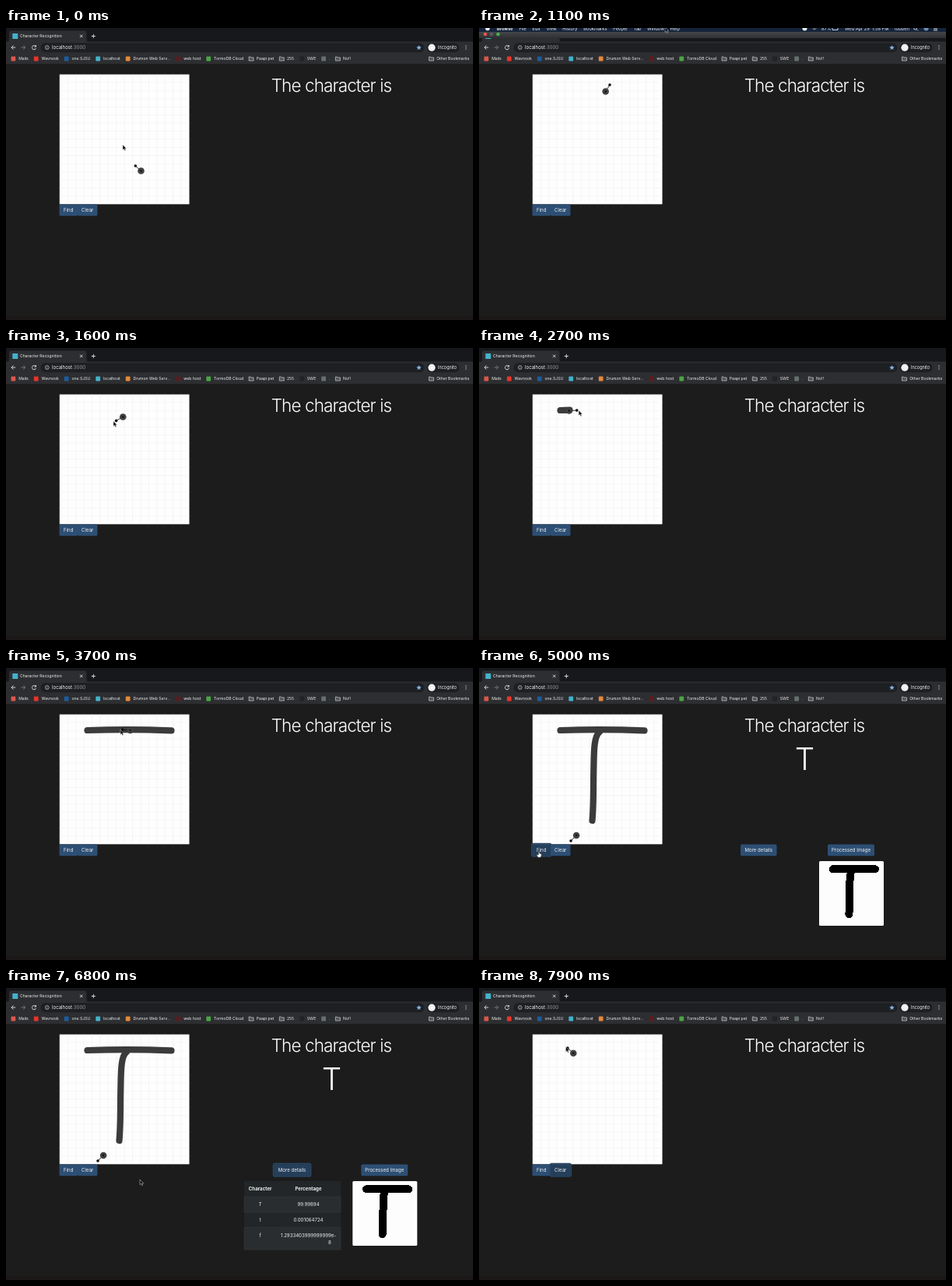
An HTML page that plays this animation: 600 by 375 pixels, repeating every 8000 ms.

```html
<!DOCTYPE html>
<html lang="en">
<head>
<meta charset="utf-8">
<title>Character Recognition</title>
<style>
  html, body { margin: 0; width: 100%; height: 100%; overflow: hidden; background: #1c1c1c; }
  svg { display: block; width: 100vw; height: 100vh; }
  text { font-family: Inter, Roboto, "Liberation Sans", sans-serif; fill: #f1f1f2; white-space: pre; }
  .ui { font-size: 5.1px; }
  .menu { font-size: 5.7px; }
  .url { font-size: 6.1px; }
  .btn text, .cell { font-size: 6.1px; text-anchor: middle; }
  .btn .face { fill: #2d4f74; }
  .btn .ring { fill: none; stroke: #294765; stroke-width: 1.6; }
  .bold { font-weight: 700; }
  .title, .answer { font-weight: 300; text-anchor: middle; fill: #fff; }
  .title { font-size: 22.5px; letter-spacing: -.9px; }
  .answer { font-size: 40px; }
  .line { fill: none; stroke: #e4e6e8; stroke-width: .9; }
  .thin { stroke-width: .6; }
  .ink { fill: none; stroke: #3b3b3b; stroke-width: 8.2; stroke-linecap: round; stroke-linejoin: round; }
  .scan { stroke: #000; stroke-width: 20; shape-rendering: crispEdges; }
</style>
</head>
<body>
<svg viewBox="0 0 600 375" preserveAspectRatio="none">
  <defs>
    <path id="barShape" pathLength="100" d="M104.500 80Q158 78 212.500 80.300"/>
    <path id="stemShape" pathLength="100" d="M155 82C147 88 147.800 110 147.300 130S147.500 175 145.500 196"/>
    <linearGradient id="titleBar" x2="0" y2="1">
      <stop stop-color="#45474b"/><stop offset="1" stop-color="#2f3033"/>
    </linearGradient>
  </defs>
  <rect width="600" height="375" fill="#1c1c1c"/>
  <rect y="370" width="600" height="5" fill="#1c1818"/>

  <!-- browser window -->
  <rect width="600" height="18" fill="#17181b"/>
  <rect y="17.500" width="600" height="28.500" fill="#2d2e31"/>
  <path d="M2 18Q4 18 4 15.500V6Q4 3.500 6.500 3.500H101Q103.500 3.500 103.500 6V15.500Q103.500 18 106 18Z" fill="#2d2e31"/>
  <rect x="8.300" y="7" width="7" height="7" rx=".6" fill="#42b3cb"/>
  <text class="ui" x="18" y="12.300">Character Recognition</text>
  <path class="line" d="M95 8.700l3.400 3.400m0-3.400l-3.400 3.400M109.700 10.500h5.200m-2.600-2.600v5.200"/>
  <rect x="44.500" y="19.200" width="493" height="12" rx="6" fill="#1e1f22"/>
  <path class="line" d="M12.200 25H7m2.500-2.600L6.900 25l2.600 2.600"/>
  <path class="line" style="stroke:#7c7e81" d="M19.500 25h5.200m-2.500-2.600l2.600 2.600l-2.600 2.600"/>
  <path class="line" d="M38.200 23.600a2.600 2.600 0 1 0 .4 2.200M38.500 22v2h-2"/>
  <circle class="line thin" cx="52.800" cy="25" r="2.400"/>
  <path class="line thin" d="M52.800 24.700v1.700m0-3v.6"/>
  <text class="url" x="59" y="27.200">localhost<tspan fill="#94979b">:3000</tspan></text>
  <path d="M530.500 21.900l.9 2.100 2.300.2-1.700 1.500.5 2.300-2-1.200-2 1.200.5-2.300-1.700-1.500 2.300-.2Z" fill="#83b0f5"/>
  <rect x="540.500" y="19.200" width="42" height="12" rx="6" fill="#1e1f22"/>
  <circle cx="547" cy="25.200" r="4.600" fill="#f0f1f2"/>
  <text class="ui" style="font-size:5.500px" x="555" y="27.100">Incognito</text>
  <path d="M591 22.900v.01m0 2.090v.01m0 2.090v.01" stroke="#e4e6e8" stroke-width="1.200" stroke-linecap="round"/>
  <g id="bookmarks"></g>

  <!-- system menu that slides over the tabs -->
  <g id="menu">
    <rect y="9" width="600" height="8.500" fill="url(#titleBar)"/>
    <circle cx="8" cy="12.500" r="2.300" fill="#e2574e"/>
    <circle cx="16" cy="12.500" r="2.300" fill="#5a5b5e"/>
    <circle cx="24.500" cy="12.500" r="2.300" fill="#45b549"/>
    <rect width="600" height="9.300" fill="#14233b"/>
    <circle cx="11" cy="5" r="2.800" fill="#eee"/>
    <circle cx="418.500" cy="5" r="3" fill="#eee"/>
    <path class="line" d="M428 4.500q3-2.500 6 0m-4.500 1.600q1.500-1.200 3 0M454 3h7v4h-7z"/>
    <text class="menu" x="440" y="7.500">87%</text>
    <text class="menu" x="470" y="7.500">Wed Apr 29  1:58 PM</text>
    <text class="menu" x="534" y="7.500">tobben</text>
    <circle class="line" cx="560.500" cy="4.700" r="1.900"/>
    <path class="line" d="M562 6.200l1.800 1.800M584 3.500h5m-5 2h5m-5 2h5"/>
    <circle cx="574.500" cy="5" r="3" fill="#6c8fb5"/>
  </g>

  <!-- drawing board -->
  <rect id="board" fill="#fefefe"/>
  <path id="grid" fill="none" stroke="#ececed" stroke-width=".5"/>
  <use id="bar" class="ink" href="#barShape"/>
  <use id="stem" class="ink" href="#stemShape"/>
  <path id="link" stroke="#161616" stroke-width=".9"/>
  <g id="brush"><circle r="4.300" fill="#404040"/><circle r="1.200" fill="#111"/></g>
  <circle id="tip" r="1.800" fill="#0a0a0a"/>

  <text class="title" x="418" y="82">The character is</text>
  <g id="buttons"></g>
  <g id="result">
    <text class="answer" x="418.500" y="130.500">T</text>
    <g id="processed">
      <rect x="437" y="248" width="83" height="83" rx="1.600" fill="#fdfdfd"/>
      <g transform="translate(402.600 218.200) scale(.5)">
        <use class="ink scan" href="#barShape"/><use class="ink scan" href="#stemShape"/>
      </g>
    </g>
  </g>
  <g id="table">
    <rect x="306" y="248" width="124" height="88" fill="#222628"/>
    <path d="M306 268.300h124v19.700H306zM306 307.500h124V336H306z" fill="#2a2d2f" stroke="#34383b" stroke-width=".6"/>
  </g>

  <path id="arrow" d="M0 0V6.500L1.500 5.200 2.600 7.600 3.800 7 2.700 4.800H4.700Z" fill="#080808" stroke="#ddd" stroke-width=".5"/>
  <path id="hand" d="M-.7.500Q0-.5.700.500V3L3.200 3.800V6L2.200 8.200H-1.300L-2.800 5.200-2.300 4.300-.7 5Z" fill="#fff" stroke="#111" stroke-width=".5"/>
</svg>
<script>
const NS = "http://www.w3.org/2000/svg";
const LOOP = 8000, STEP = 100;
const BOARD = { x: 68.8, y: 59.6, size: 166.7 };
const REACH = 10;   // length of the string between pointer and brush
const LAG = 20;     // delay of the drawn pointer behind the cursor, ms
const CLICK_FIND = 4500, SOLVED = 4700, CLICK_DETAILS = 5900, EXPANDED = 6000, CLEARED = 7400;

const $ = id => document.getElementById(id);
function add(parent, tag, attrs, content) {
  const el = document.createElementNS(NS, tag);
  for (const key in attrs) el.setAttribute(key, attrs[key]);
  if (content) el.textContent = content;
  parent.appendChild(el);
  return el;
}
const show = (el, on) => el.setAttribute("visibility", on ? "visible" : "hidden");
const move = (el, x, y) => el.setAttribute("transform", `translate(${x} ${y})`);
const clamp = v => Math.max(0, Math.min(1, v));

// Bookmarks flow from the left; one without a colour is a folder. Returns the end of the label.
function bookmark(label, color, x) {
  const box = $("bookmarks");
  if (color) add(box, "rect", { x, y: 36.6, width: 5.8, height: 5.8, rx: 1, fill: color });
  else add(box, "path", { class: "line thin", style: "fill:#505255", d: `M${x} 37h2l.8 .9h3.200v4.100h-6z` });
  const text = add(box, "text", { class: "ui", x: x + 9.7, y: 41.2 }, label);
  return x + 9.7 + text.getComputedTextLength();
}
[["Mails", "#d8574c"], ["Wavnook", "#e8342c"], ["one.SJSU", "#1c5c9e"], ["localhost", "#42b3cb"],
 ["Drumon Web Serv...", "#e58a3a"], ["web host", "#5c1c22"], ["TormoDB Cloud", "#4aa545"],
 ["Paapi pet"], ["255"], ["SWE", "#222326"], [".", "#65706a"], ["No!!"]
].reduce((x, [label, color]) => bookmark(label, color, x) + 7, 6.5);
bookmark("Other Bookmarks", null, 543.5);

"Browse File Edit View History Bookmarks People Tab Window Help".split(" ").reduce((x, label, i) => {
  const text = add($("menu"), "text", { class: i ? "menu" : "menu bold", x, y: 7.5 }, label);
  return x + text.getComputedTextLength() + 7.7;
}, 23);

for (const [key, value] of Object.entries({ x: BOARD.x, y: BOARD.y, width: BOARD.size, height: BOARD.size }))
  $("board").setAttribute(key, value);
let gridPath = "";
for (let i = 1; i < 16; i++) {
  const d = i * BOARD.size / 16;
  gridPath += `M${BOARD.x + d} ${BOARD.y}v${BOARD.size}M${BOARD.x} ${BOARD.y + d}h${BOARD.size}`;
}
$("grid").setAttribute("d", gridPath);

[["Character", "Percentage"], ["T", "99.99894"], ["t", "0.001064724"], ["f", "1.2933403999999999e-"]
].forEach((row, i) => row.forEach((label, column) => add($("table"), "text", {
  class: i ? "cell" : "cell bold", x: column ? 388.5 : 326.7, y: 260.4 + 19.7 * i
}, label)));
add($("table"), "text", { class: "cell", x: 416, y: 329 }, "8");

function makeButton(label, x, width) {
  const g = add($("buttons"), "g", { class: "btn" });
  const face = add(g, "rect", { class: "face", x, y: 226.4, width, height: 14.8, rx: 1.7 });
  const ring = add(g, "rect", { class: "ring", x: x - .8, y: 225.6, width: width + 1.6, height: 16.4, rx: 2.2 });
  add(g, "text", { x: x + width / 2, y: 236.2 }, label);
  return { g, face, ring, x, width };
}
const find = makeButton("Find", 68.5, 23.5);
const clear = makeButton("Clear", 92, 25.5);
const details = makeButton("More details", 336, 46.5);
const image = makeButton("Processed Image", 448, 60);

// Turning points of the cursor: time, x, y
const cursorPath = [
  [0, 150, 150], [100, 104, 227], [300, 104, 227], [700, 152, 94], [800, 152, 94],
  [880, 168, 73], [1100, 239, -1], [1300, 241, 1], [1500, 156, 91], [1600, 138, 94],
  [1700, 104, 216], [2400, 96, 70], [2600, 116, 80], [3500, 225, 81], [3600, 160, 81],
  [3700, 147, 79], [4080, 144, 206], [4180, 118, 222], [4400, 77, 235], [5100, 77, 235],
  [5400, 110, 235], [5800, 364, 234], [6000, 366, 234], [6300, 497, 236], [6800, 172, 246],
  [7200, 104, 234], [7500, 105, 234], [7600, 147, 98], [7900, 111.5, 75.5]];

function cursorAt(t) {
  const next = cursorPath.findIndex(point => point[0] > t);
  if (next < 0) return cursorPath[cursorPath.length - 1].slice(1);
  const [t0, x0, y0] = cursorPath[next - 1], [t1, x1, y1] = cursorPath[next];
  const p = (t - t0) / (t1 - t0);
  return [x0 + (x1 - x0) * p, y0 + (y1 - y0) * p];
}
const onBoard = ([x, y]) =>
  x > BOARD.x && x < BOARD.x + BOARD.size && y > BOARD.y && y < BOARD.y + BOARD.size;

// The pointer pulls the brush along once the string between them is taut.
const poses = [{ tip: [166.3, 177], brush: [173.5, 183.5] }];
for (let t = STEP; t < LOOP; t += STEP) {
  const last = poses[poses.length - 1];
  const point = cursorAt(t - LAG);
  const tip = onBoard(point) ? point : last.tip;
  const dx = last.brush[0] - tip[0], dy = last.brush[1] - tip[1];
  const slack = Math.min(1, REACH / Math.hypot(dx, dy));
  poses.push({ tip, brush: [tip[0] + dx * slack, tip[1] + dy * slack] });
}

function drawInk(el, t, start, end) {
  const p = clamp((t - start) / (end - start));
  show(el, p > 0 && t < CLEARED);
  el.setAttribute("stroke-dasharray", `${p * 100} 200`);
}

function styleButton(button, focused, hovered) {
  show(button.ring, focused);
  button.face.style.fill = focused ? "#253f5b" : hovered ? "#28486a" : "#2d4f74";
}

function render(t) {
  const solved = t >= SOLVED && t < CLEARED;
  const expanded = t >= EXPANDED && t < CLEARED;
  const shift = expanded ? 8.3 : 0;
  const [x, y] = cursorAt(t);
  const { tip, brush } = poses[t / STEP];

  const menuOpen = Math.min(clamp((t - 850) / 333), clamp((1500 - t) / 200));
  move($("menu"), 0, 18 * (menuOpen - 1));
  drawInk($("bar"), t, 2600, 3500);
  drawInk($("stem"), t, 3700, 4100);
  move($("brush"), ...brush);
  move($("tip"), ...tip);
  $("link").setAttribute("d", `M${brush}L${tip}`);

  show($("result"), solved);
  show($("table"), expanded);
  move($("processed"), shift, 0);
  for (const button of [details, image]) {
    button.g.style.display = solved ? "" : "none";
    move(button.g, shift, 0);
  }

  const over = (b, dx = 0) => y > 226 && y < 241 && x >= b.x + dx && x <= b.x + dx + b.width;
  const overFind = over(find), overClear = over(clear);
  const overDetails = solved && over(details, shift), overImage = solved && over(image, shift);
  styleButton(find, t >= CLICK_FIND && t < CLICK_DETAILS, overFind);
  styleButton(clear, t >= CLEARED, overClear);
  styleButton(details, t >= CLICK_DETAILS && t < CLEARED, overDetails);
  styleButton(image, false, overImage);

  const pointing = overFind || overClear || overDetails || overImage;
  show($("arrow"), !pointing);
  show($("hand"), pointing);
  move($("arrow"), x, y);
  move($("hand"), x, y);
}

const start = performance.now();
function tick() {
  const t = (performance.now() - start) % LOOP;
  render(Math.floor(t / STEP) * STEP);
  requestAnimationFrame(tick);
}
tick();
</script>
</body>
</html>
```
